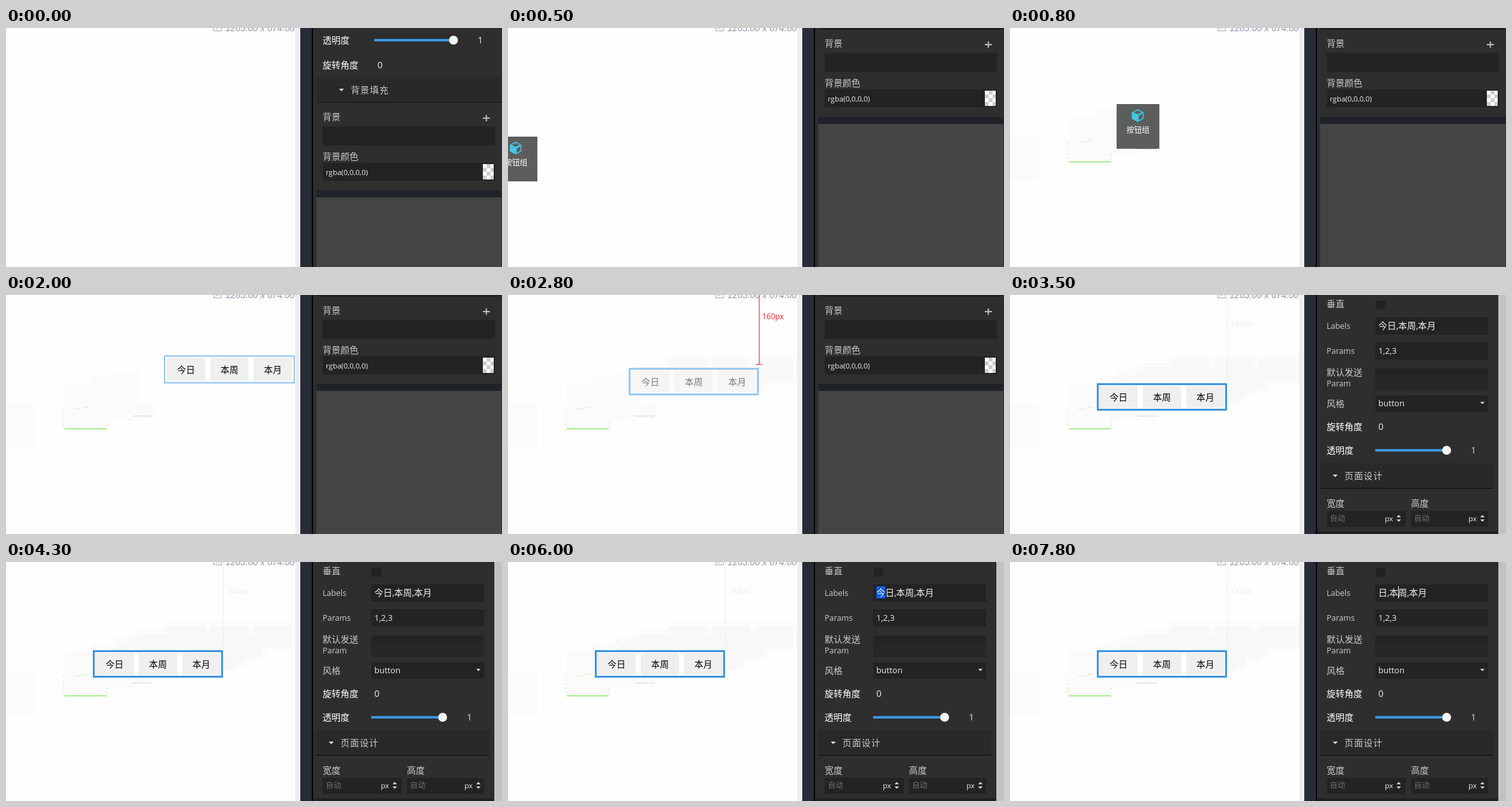
Animation of 777x374 px, one loop 8 s. Source, as an HTML page with a canvas:

```html
<!DOCTYPE html>
<html lang="zh-CN">
<head>
<meta charset="utf-8">
<style>
  html, body { margin: 0; width: 777px; height: 374px; overflow: hidden; background: #fff; }
  canvas { display: block; }
</style>
</head>
<body>
<canvas id="stage" width="777" height="374"></canvas>
<script>
const g = document.getElementById('stage').getContext('2d');
const LOOP = 8000;
const UI = '"Open Sans", "Noto Sans CJK SC", "Noto Sans CJK", sans-serif';
const BLUE = '#3c96e0', FIELD = '#232323';

const CARD = [[-21, 170], [92, 139], [133, 127], [167, 119], [204, 101], [238, 95]];
const GROUP = [[248, 95], [202, 108], [189, 114], [170, 122], [158, 130], [136, 138]];

function box(x, y, w, h, color) {
  g.fillStyle = color;
  g.fillRect(x, y, w, h);
}

function line(x1, y1, x2, y2, color, dash = []) {
  g.beginPath();
  g.moveTo(x1, y1);
  g.lineTo(x2, y2);
  g.strokeStyle = color;
  g.lineWidth = 1;
  g.setLineDash(dash);
  g.stroke();
  g.setLineDash([]);
}

// Text whose line is centred on cy.
function text(s, x, cy, color = '#ddd', size = 14, align = 'left', spacing = 0) {
  g.font = `${size}px ${UI}`;
  g.textAlign = align;
  g.letterSpacing = spacing + 'px';
  g.fillStyle = color;
  g.fillText(s, x, Math.round(cy + size * 0.36));
  g.letterSpacing = '0px';
}

function poly(points, color) {
  g.beginPath();
  points.forEach(([x, y]) => g.lineTo(x, y));
  g.closePath();
  g.fillStyle = color;
  g.fill();
}

function arrow(x, y, r, dir = 1) {
  poly([[x - r, y - dir * r / 2], [x + r, y - dir * r / 2], [x, y + dir * r / 2]], '#ddd');
}

function slider(x1, x2, y) {
  box(x1, y - 2, x2 - x1, 4, BLUE);
  g.beginPath();
  g.arc(x2, y, 7, 0, 7);
  g.fillStyle = '#f4f4f4';
  g.fill();
}

function cube(x, y, r) {
  const w = r * 0.92, h = r / 2;
  const color = '#43c5e6', hollow = '#5c5e5e';
  poly([[x, y - r], [x + w, y - h], [x + w, y + h], [x, y + r], [x - w, y + h], [x - w, y - h]], color);
  poly([[x, y - r + 2], [x + w - 3, y - h], [x, y - 2], [x - w + 3, y - h]], hollow);
  poly([[x + 1.5, y + 0.5], [x + w - 1.5, y - h + 2], [x + w - 1.5, y + h - 1], [x + 1.5, y + r - 2.5]], hollow);
}

function card([x, y]) {
  box(x, y, 67, 70, '#5c5e5e');
  cube(x + 33, y + 18, 10);
  text('按钮组', x + 33.5, y + 41, '#fff', 12, 'center');
}

function buttons([x, y], color) {
  for (let i = 0; i < 3; i++) box(x + 4 + i * 68, y + 4, 60, 35, color);
}

function outline([x, y], width, color) {
  g.strokeStyle = color;
  g.lineWidth = width;
  g.strokeRect(x + width / 2, y + width / 2, 204 - width, 43 - width);
}

function group(at, width, alpha = 1) {
  const [x, y] = at;
  g.globalAlpha = alpha;
  box(x, y, 204, 43, '#fff');
  buttons(at, '#efefef');
  ['今日', '本周', '本月'].forEach((s, i) => text(s, x + 34 + i * 68, y + 22, '#000', 14, 'center'));
  outline(at, width, BLUE);
  g.globalAlpha = 1;
}

function ruler([x, y], color) {
  const rx = x + 204;
  box(rx, 0, 1, y - 6, color);
  box(rx - 5, y - 6, 10, 1, color);
  text(`${y + 46}px`, rx + 5, (y - 46) / 2, color, 12);
}

// Faint marks left behind by the dragged card and button group.
function trails(t) {
  const done = Math.min(4, Math.floor((t - 500) / 100));
  for (let i = 0; i < done; i++) {
    const [x, y] = CARD[i];
    const cut = i === 3 ? 42 : 67;
    box(x, y, cut, 70, '#fbfbfb');
    if (i === 3) box(x + cut, 170, 25, 19, '#fbfbfb');
  }
  if (done > 1) {
    const green = '#62e23c';
    line(92, 209.5, 158, 209.5, green);
    line(90.5, 179, 90.5, 207, green, [1, 5]);
    line(158.5, 198, 158.5, 207, green, [1, 5]);
    line(107, 179, 130, 175, green, [1, 3]);
  }
  if (done > 2) line(200, 189.5, 228, 189.5, '#888', [1, 2]);

  const moved = GROUP.slice(0, Math.max(0, Math.min(5, Math.floor((t - 2600) / 100))));
  moved.forEach(at => {
    box(...at, 204, 43, '#fdfdfd');
    outline(at, 1, '#f7f7f7');
  });
  moved.forEach(at => buttons(at, '#f8f8f8'));
}

function page(t) {
  box(0, 0, 777, 374, '#fefefe');
  trails(t);
  g.strokeStyle = '#a3aab5';
  g.lineWidth = 1;
  g.strokeRect(325.5, -5.5, 12, 10);
  line(328, -1, 331, 1.5, '#a3aab5');
  line(331, 1.5, 336, -4, '#a3aab5');
  g.font = 'italic 14px "Liberation Sans", Arial, sans-serif';
  g.textAlign = 'left';
  g.fillStyle = '#8b94a6';
  g.fillText('1265.00 x 674.00', 344, 5);

  if (t >= 500 && t < 1100) card(CARD[Math.floor((t - 500) / 100)]);
  if (t >= 2000 && t < 2600) group(GROUP[0], 1);
  if (t >= 2600 && t < 3500) {
    const at = GROUP[Math.min(5, Math.floor((t - 2600) / 100))];
    ruler(at, '#e8262c');
    group(at, 3, 0.5);
  }
  if (t >= 3500) {
    ruler(GROUP[5], '#ececec');
    group(GROUP[5], 3);
  }
}

function frame() {
  box(453, 0, 8, 374, '#eeeeef');
  box(461, 0, 18, 374, '#282c36');
  box(479, 0, 2, 374, '#000');
  box(481, 0, 296, 374, '#2e2e2e');
}

function fillPanel(shift) {
  g.save();
  g.translate(0, -shift);
  text('透明度', 496, 19, '#fff');
  slider(577, 701, 19);
  text('1', 739, 19, '#eee');
  text('旋转角度', 496, 58, '#fff');
  text('0', 582, 58, '#eee');
  box(486, 77, 290, 39, '#292929');
  box(486, 116, 290, 1, '#161616');
  arrow(525.5, 97, 4);
  text('背景填充', 540, 97, '#ccc', 14, 'left', 1);
  text('背景', 496, 139, '#ccc');
  box(747, 140, 11, 2, '#bbb');
  box(751.5, 136, 2, 10, '#bbb');
  box(496, 154, 270, 30, FIELD);
  text('背景颜色', 496, 201, '#ccc');
  box(496, 211, 270, 28, FIELD);
  text('rgba(0,0,0,0)', 501, 226, '#eee', 11.5);
  for (let r = 0; r < 4; r++)
    for (let c = 0; c < 3; c++)
      box(747 + c * 6, 213 + r * 6, c < 2 ? 6 : 5, 6, (r + c) % 2 ? '#ccc' : '#fff');
  box(486, 254, 290, 11, '#1f2229');
  box(486, 265, 290, 300, '#444');
  g.restore();
}

function labelsField(t) {
  box(572, 35, 177, 27, FIELD);
  const cut = t >= 7100;
  if (t >= 6000 && !cut) box(577, 38, 14, 19, '#0b62dc');
  const chars = cut ? '日,本周,本月' : '今日,本周,本月';
  let x = 577;
  for (const c of chars) {
    text(c, x, 48, '#eee');
    x += c === ',' ? 3 : 14;
  }
  const caret = t >= 7800 ? 608
    : t >= 7100 && t < 7500 ? 577
    : t >= 5500 && t < 6000 ? 591 : 0;
  if (caret) box(caret, 38, 1, 19, '#fff');
}

function sizeField(label, x, w) {
  text(label, x, 326, '#ccc');
  box(x, 338, w, 25, FIELD);
  text('自动', x + 5, 350, '#707070', 12);
  const right = x === 496 ? 609 : 740;
  text('px', right - 9, 350, '#eee', 11.5, 'right');
  arrow(right, 346, 3.5, -1);
  arrow(right, 353, 3.5);
}

function groupPanel(t) {
  text('垂直', 496, 14, '#ccc');
  box(573, 9, 15, 14, '#222');
  text('Labels', 496, 48, '#ccc', 12.5);
  labelsField(t);
  text('Params', 496, 87, '#ccc', 12.5);
  box(572, 74, 177, 27, FIELD);
  text('1,2,3', 577, 87, '#eee', 13);
  text('默认发送', 496, 121, '#ccc');
  text('Param', 496, 138, '#ccc', 12.5);
  box(572, 115, 177, 34, '#272727');
  box(572, 115, 177, 9, FIELD);
  text('风格', 496, 170, '#ccc');
  box(572, 157, 177, 26, FIELD);
  text('button', 577, 169, '#eee', 13);
  arrow(740, 169, 3.5);
  text('旋转角度', 496, 206, '#fff');
  text('0', 577, 206, '#eee');
  text('透明度', 496, 243, '#fff');
  slider(572, 684, 243);
  text('1', 722, 243, '#e8dcc0');
  box(486, 263, 271, 39, '#292929');
  box(486, 302, 271, 1, '#0c0c0c');
  arrow(509.5, 283, 4);
  text('页面设计', 524, 283, '#ccc', 14, 'left', 1);
  sizeField('宽度', 496, 124);
  sizeField('高度', 628, 121);
  box(481, 370, 283, 4, '#202020');
  box(765, 0, 12, 374, '#c2c2c4');
}

function draw(t) {
  page(t);
  frame();
  if (t < 3500) fillPanel(t < 500 ? 0 : 115);
  else groupPanel(t);
}

const start = performance.now();
function tick() {
  draw((performance.now() - start) % LOOP);
  requestAnimationFrame(tick);
}
tick();
</script>
</body>
</html>
```
